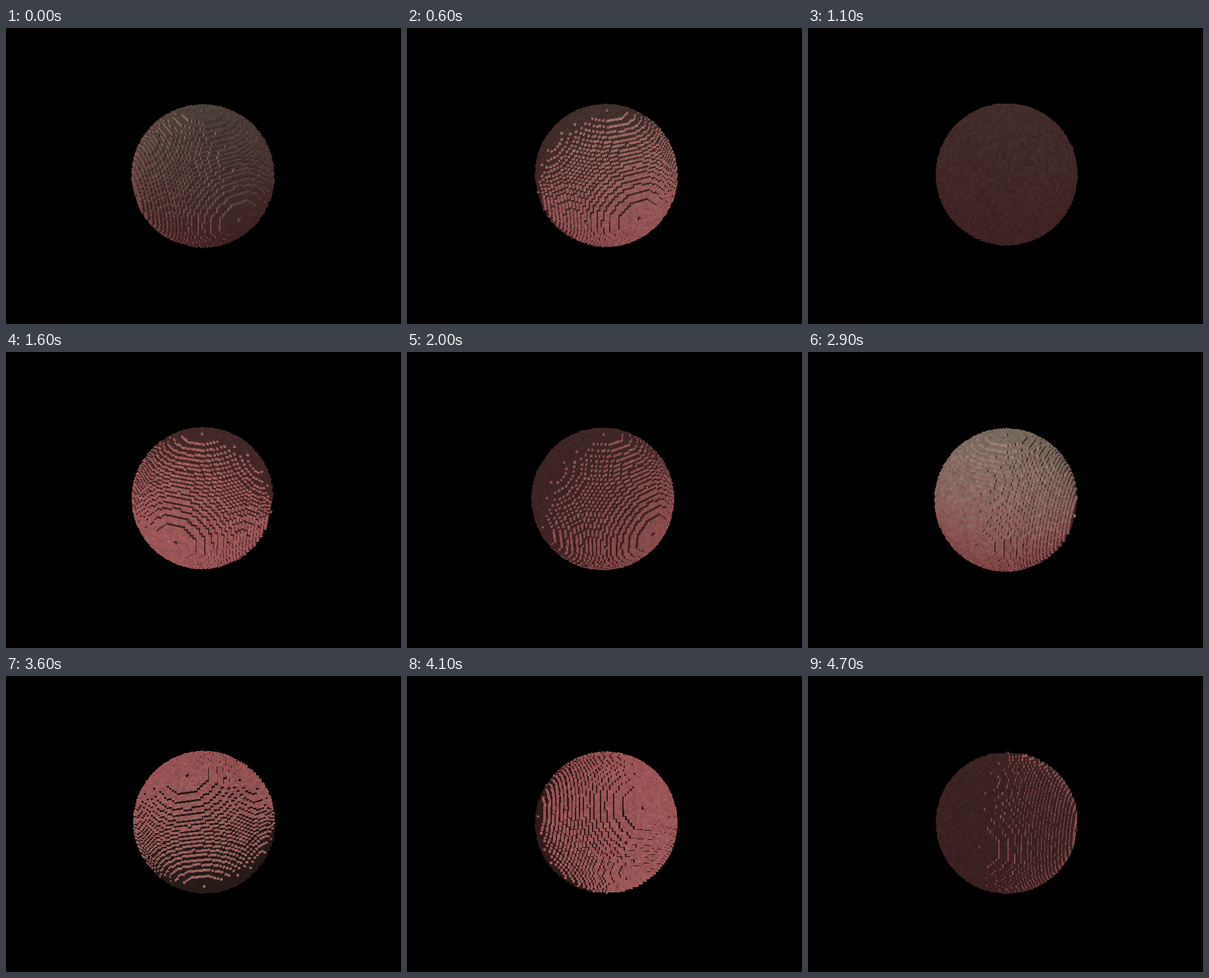
An HTML page with a canvas for the animation above (4.8 s loop, 600x450 px).

```html
<!DOCTYPE html>
<html lang="en">
<head>
<meta charset="utf-8">
<title>Voxel sphere</title>
<style>
html, body { margin: 0; width: 100%; height: 100%; overflow: hidden; background: #000; }
canvas { display: block; width: 600px; height: 450px; }
</style>
</head>
<body>
<canvas id="stage" width="600" height="450"></canvas>
<script>
const ctx = document.getElementById('stage').getContext('2d');
const LOOP = 4800, STEP = 100;
const R = 30, SHELL = R + 2.5, DIST = R * 4, FOCAL = 411;
const BOX = { x: 186, y: 110, w: 230, h: 230 };
const RED = [157, 84, 86], BEIGE = [172, 154, 136];
const rad = Math.PI / 180;

// time, camera yaw, camera pitch, light azimuth, light elevation, tint, ambient
const keys = [
  [0, 296, 36, -49, 13, 0.7, 0.4],
  [600, 383, 34.5, 22, -13, 0.45, 0.4],
  [1600, 521, 35, 173, -7, 0.15, 0.42],
  [2400, 637, 35, 238, -42, 0.15, 0.38],
  [2900, 698, 35, 364, 37, 0.85, 0.4],
  [3600, 708, -34.5, 347, 14, -0.35, 0.24],
  [4700, 790, 18, 398, -5, 0.15, 0.38]
];

function pose(t) {
  let i = 0;
  while (i < keys.length - 2 && t > keys[i + 1][0]) i++;
  const a = keys[i], b = keys[i + 1];
  const k = Math.min(1, (t - a[0]) / (b[0] - a[0]));
  return a.map((v, n) => v + (b[n] - v) * k);
}

// stable random value for one voxel
function grain(x, y, z) {
  let h = Math.imul(x, 374761393) + Math.imul(y, 668265263) + Math.imul(z, 1274126177);
  h = Math.imul(h ^ (h >>> 13), 1103515245);
  return ((h ^ (h >>> 16)) >>> 0) / 4294967296;
}

// walk a ray through the grid; gives the axis of the face it hits, or -1
const cell = [0, 0, 0], step = [0, 0, 0], next = [0, 0, 0], delta = [0, 0, 0];
function trace(o, d) {
  let b = 0, c = -SHELL * SHELL;
  for (let n = 0; n < 3; n++) {
    const q = o[n] - 0.5;
    b += q * d[n];
    c += q * q;
  }
  const disc = b * b - c;
  if (disc < 0) return -1;
  const root = Math.sqrt(disc), start = -b - root, end = -b + root;
  for (let n = 0; n < 3; n++) {
    const p = o[n] + d[n] * start, dn = d[n] || 1e-9;
    cell[n] = Math.floor(p);
    step[n] = dn > 0 ? 1 : -1;
    delta[n] = Math.abs(1 / dn);
    next[n] = start + (cell[n] + (dn > 0 ? 1 : 0) - p) / dn;
  }
  for (;;) {
    let n = next[0] < next[1] ? 0 : 1;
    if (next[2] < next[n]) n = 2;
    if (next[n] > end) return -1;
    cell[n] += step[n];
    next[n] += delta[n];
    if (cell[0] * cell[0] + cell[1] * cell[1] + cell[2] * cell[2] <= R * R) return n;
  }
}

const img = ctx.createImageData(BOX.w, BOX.h);

function render(t) {
  const [, yaw, pitch, az, el, tint, amb] = pose(t);
  const cy = Math.cos(yaw * rad), sy = Math.sin(yaw * rad);
  const cp = Math.cos(pitch * rad), sp = Math.sin(pitch * rad);
  const toWorld = (x, y, z) => {
    const h = z * cp - y * sp;
    return [x * cy - h * sy, y * cp + z * sp, x * sy + h * cy];
  };
  const eye = toWorld(0, 0, DIST);
  const ce = Math.cos(el * rad), far = R * 7;
  const lamp = [Math.sin(az * rad) * ce * far, Math.sin(el * rad) * far, Math.cos(az * rad) * ce * far];
  const px = img.data;
  px.fill(0);

  for (let j = 0; j < BOX.h; j++) {
    for (let i = 0; i < BOX.w; i++) {
      const x = BOX.x + i + 0.5 - 300, y = 225 - (BOX.y + j + 0.5);
      const len = Math.hypot(x, y, FOCAL);
      const axis = trace(eye, toWorld(x / len, y / len, -FOCAL / len));
      const at = (j * BOX.w + i) * 4;
      px[at + 3] = 255;
      if (axis < 0) continue;

      const ray = lamp.map((v, n) => v - cell[n]);
      const toward = -step[axis] * ray[axis] / Math.hypot(ray[0], ray[1], ray[2]);
      const light = amb + (1 - amb) * Math.max(0, toward);
      const g = grain(cell[0], cell[1], cell[2]);
      // flat tops and the upper side take the paler tone
      const pale = 0.22 + 0.6 * cell[1] / R * Math.sign(tint) + (axis === 1 ? 0.35 : 0);
      const mix = Math.max(0, Math.min(1, pale * Math.abs(tint) + (g - 0.5) * 0.25));
      const level = light * (0.92 + 0.14 * grain(cell[2], cell[0], cell[1]));
      for (let c = 0; c < 3; c++) px[at + c] = (RED[c] + (BEIGE[c] - RED[c]) * mix) * level;
    }
  }
  ctx.putImageData(img, BOX.x, BOX.y);
}

ctx.fillStyle = '#000';
ctx.fillRect(0, 0, 600, 450);
const begin = performance.now();
let shown = -1;

function tick() {
  const t = Math.max(0, performance.now() - begin) % LOOP;
  const slot = Math.floor(t / STEP);
  if (slot !== shown) {
    shown = slot;
    render(slot * STEP);
  }
  requestAnimationFrame(tick);
}
tick();
</script>
</body>
</html>
```
